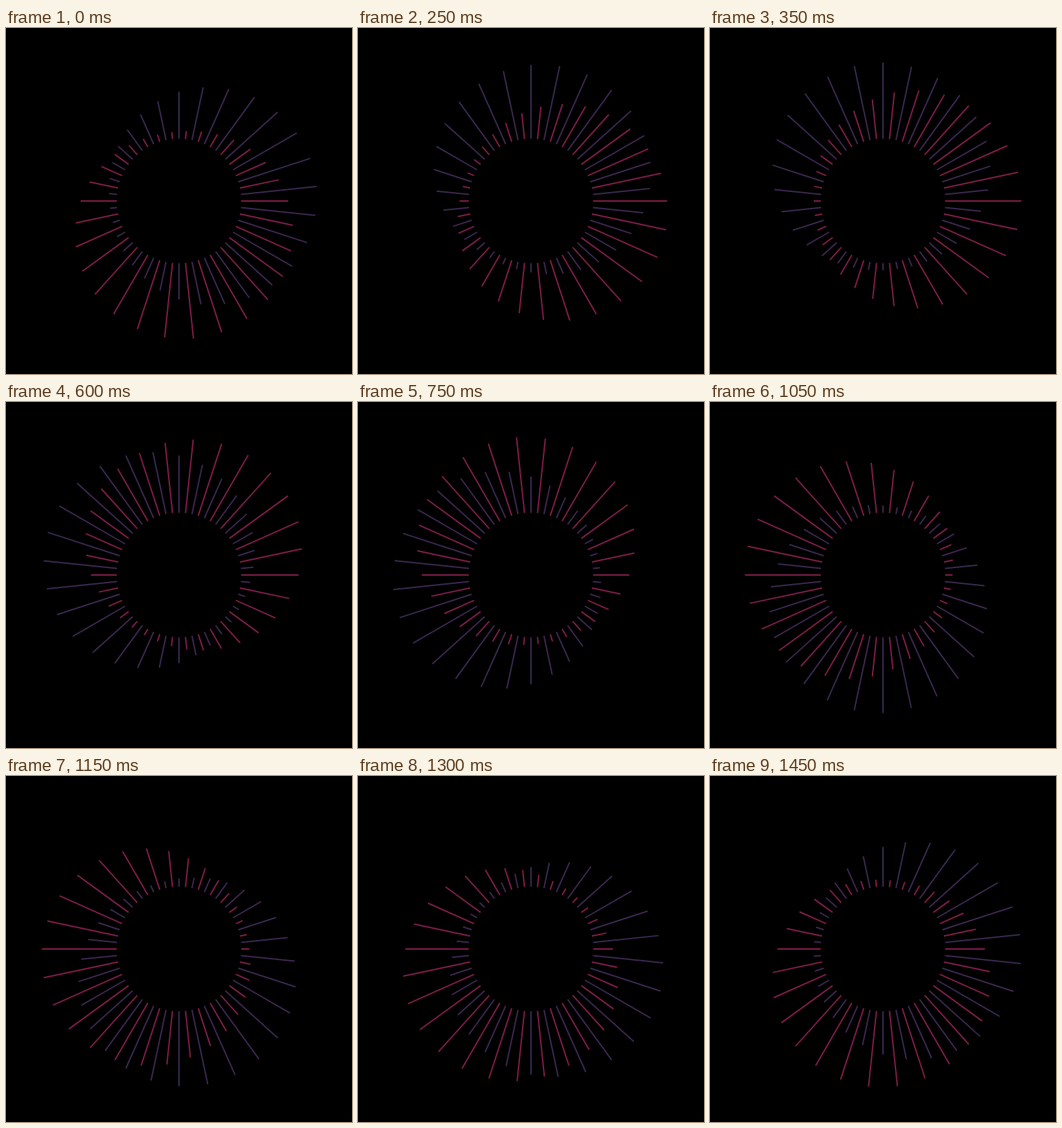
An HTML page for the animation above (1.5 s loop, 500 by 500 pixels).

```html
<!DOCTYPE html>
<html lang="en">
<head>
<meta charset="utf-8">
<title>Radial wave</title>
<style>
  html, body { margin: 0; width: 100%; height: 100%; overflow: hidden; background: #000; }
  svg { display: block; width: 100%; height: 100%; }
  path { fill: none; stroke-width: 2; stroke-linecap: butt; }
</style>
</head>
<body>
<svg viewBox="0 0 500 500">
  <path id="purple" stroke="#3b2850"/>
  <path id="red" stroke="#7f1d48"/>
</svg>
<script>
const LOOP = 1500, STEP = 50, RAYS = 30;
const CENTER = 250, INNER = 90, MID = 150, SWING = 50;
const PHASE = 81; // degrees from a set's first ray to its longest point at time zero

const sets = [
  { path: document.getElementById('purple'), base: 0 },
  { path: document.getElementById('red'), base: 90 }
];

const rad = deg => deg * Math.PI / 180;

// Angles run clockwise from the top.
function point(deg, r) {
  const a = rad(deg);
  return (CENTER + r * Math.sin(a)).toFixed(3) + ' ' + (CENTER - r * Math.cos(a)).toFixed(3);
}

function rays(base, turn) {
  let d = '';
  for (let i = 0; i < RAYS; i++) {
    const offset = i * 360 / RAYS;
    const outer = MID + SWING * Math.cos(rad(offset - PHASE + turn));
    d += 'M' + point(base + offset, INNER) + 'L' + point(base + offset, outer);
  }
  return d;
}

function draw(ms) {
  const step = Math.floor((ms % LOOP) / STEP);
  const turn = 360 * step * STEP / LOOP;
  for (const s of sets) s.path.setAttribute('d', rays(s.base, turn));
}

function tick() {
  draw(performance.now());
  requestAnimationFrame(tick);
}
tick();
</script>
</body>
</html>
```
